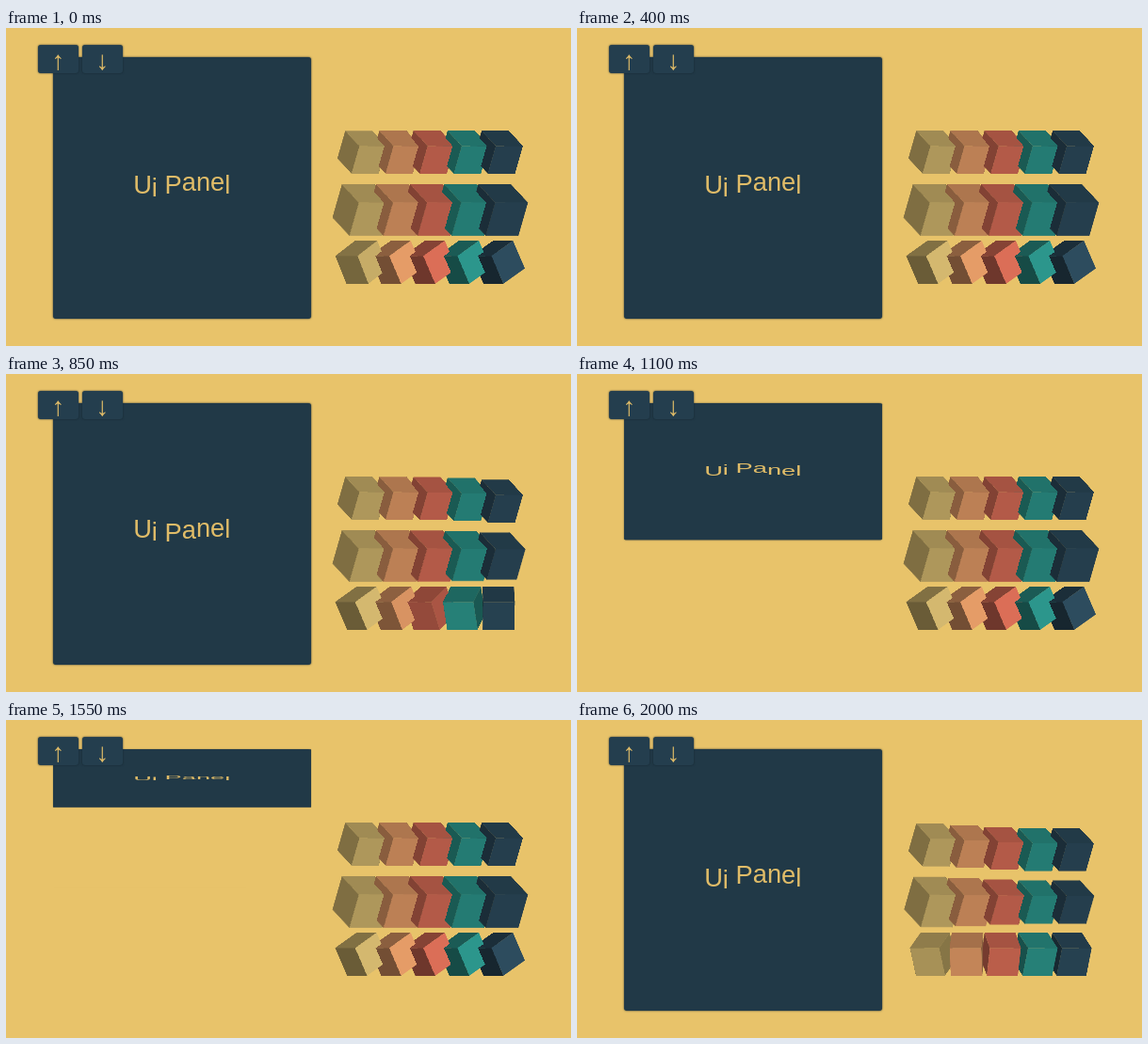
Recreate the animation shown at these times as an HTML page. Size 600 by 338 pixels, loop 2050 ms.

```html
<!DOCTYPE html>
<html lang="en">
<head>
<meta charset="utf-8">
<title>Ui Panel</title>
<style>
  html, body { margin: 0; width: 100%; height: 100%; overflow: hidden; background: #e8c36a; }
  body { position: relative; font-family: "Liberation Sans", Arial, sans-serif; color: #e0bc68; }
  .row, .cube, .face { position: absolute; left: 0; top: 0; }
  .row, .cube { width: 0; height: 0; transform-style: preserve-3d; }
  /* faces overlap a little so that no seam shows */
  .face { width: 33.8px; height: 33.8px; margin: -16.9px; }
  .front { transform: translateZ(16.7px); }
  .top { transform: rotateX(90deg) translateZ(16.7px); }
  .left { transform: rotateY(-90deg) translateZ(16.7px); }
  .right { transform: rotateY(90deg) translateZ(16.7px); }
  .panel, .btn { position: absolute; border-radius: 3px; box-shadow: 0 0 2px #14242e; }
  .panel {
    left: 50px; top: 31px; width: 273.5px; height: 278px;
    background: #213947; transform-origin: 50% 0;
  }
  .label {
    position: absolute; left: 0; right: 0; top: 117px;
    font-size: 27.3px; line-height: 32px; text-align: center; white-space: pre;
  }
  .label span { display: inline-block; white-space: pre; }
  .btn {
    top: 17.5px; width: 43px; height: 30.5px;
    background: #243e4e;
    font-size: 28px; line-height: 34px; text-align: center;
  }
  .up { left: 34px; }
  .down { left: 81px; }
</style>
</head>
<body>
<div class="panel" id="panel"><div class="label" id="label"></div></div>
<div class="btn up">↑</div>
<div class="btn down">↓</div>
<script>
const LOOP = 2050, CUBE_PERIOD = 604, TEXT_PERIOD = 404;
const COLORS = [[226, 196, 118], [244, 166, 110], [233, 117, 93], [47, 160, 149], [48, 81, 100]];
const STILL = { top: 0.71, front: 0.77, left: 0.56, right: 0.56 };

// Pose of a cube in each row for its progress p
const ROWS = [
  p => ({ y: 132 + 6 * p * p, size: 1, turn: 31, shade: STILL }),
  p => ({ y: 193.5, size: 1.2 - 0.2 * p * p, turn: 31, shade: STILL }),
  p => ({
    y: 249, size: 1, turn: -51 + 73 * p,
    shade: {
      top: 0.57 + 0.16 * p,
      front: Math.min(0.8, 0.47 + 0.7 * p),
      left: 0.5,
      right: Math.max(0.55, 0.94 - 0.9 * p)
    }
  })
];

function add(parent, tag, name) {
  const el = document.createElement(tag);
  el.className = name;
  parent.append(el);
  return el;
}

const cubes = ROWS.flatMap(pose => {
  const row = add(document.body, 'div', 'row');
  return COLORS.map((color, i) => {
    const el = add(row, 'div', 'cube');
    const faces = Object.keys(STILL).map(side => [side, add(el, 'div', 'face ' + side)]);
    return { el, faces, color, i, pose };
  });
});

const panel = document.getElementById('panel');
const label = document.getElementById('label');
const letters = [...'Ui Panel'].map(ch => {
  const span = add(label, 'span', '');
  span.textContent = ch;
  return span;
});

function ease(v) {
  v = Math.min(1, Math.max(0, v));
  return v * v * (3 - 2 * v);
}

// Smooth bump around 0, repeated every period
function bump(time, period, half) {
  const d = time - period * Math.round(time / period);
  return Math.abs(d) < half ? Math.cos(Math.PI / 2 * d / half) ** 2 : 0;
}

function drawCubes(t) {
  for (const { el, faces, color, i, pose } of cubes) {
    const { y, size, turn, shade } = pose(bump(t - 112 - 22 * i, CUBE_PERIOD, 134));
    el.style.transform = `translate3d(${378 + 36.2 * i}px, ${y}px, 0) ` +
      `scale3d(${size}, ${size}, ${size}) rotateY(${turn}deg) rotateX(-29deg)`;
    for (const [side, face] of faces) {
      face.style.background = `rgb(${color.map(c => Math.round(c * shade[side])).join()})`;
    }
  }
}

function drawPanel(t) {
  const open = 1 - ease((t - 1004) / 200) + ease((t - 1490) / 200);
  panel.style.visibility = open > 0.004 ? 'visible' : 'hidden';
  panel.style.transform = `scaleY(${open})`;
  letters.forEach((span, k) => {
    const drop = 6.5 * bump(t - (k - 1.4) * 58, TEXT_PERIOD, 160);
    span.style.transform = `translateY(${drop.toFixed(2)}px)`;
  });
}

const start = performance.now();
function tick() {
  const t = (performance.now() - start) % LOOP;
  drawCubes(t);
  drawPanel(t);
  requestAnimationFrame(tick);
}
tick();
</script>
</body>
</html>
```
